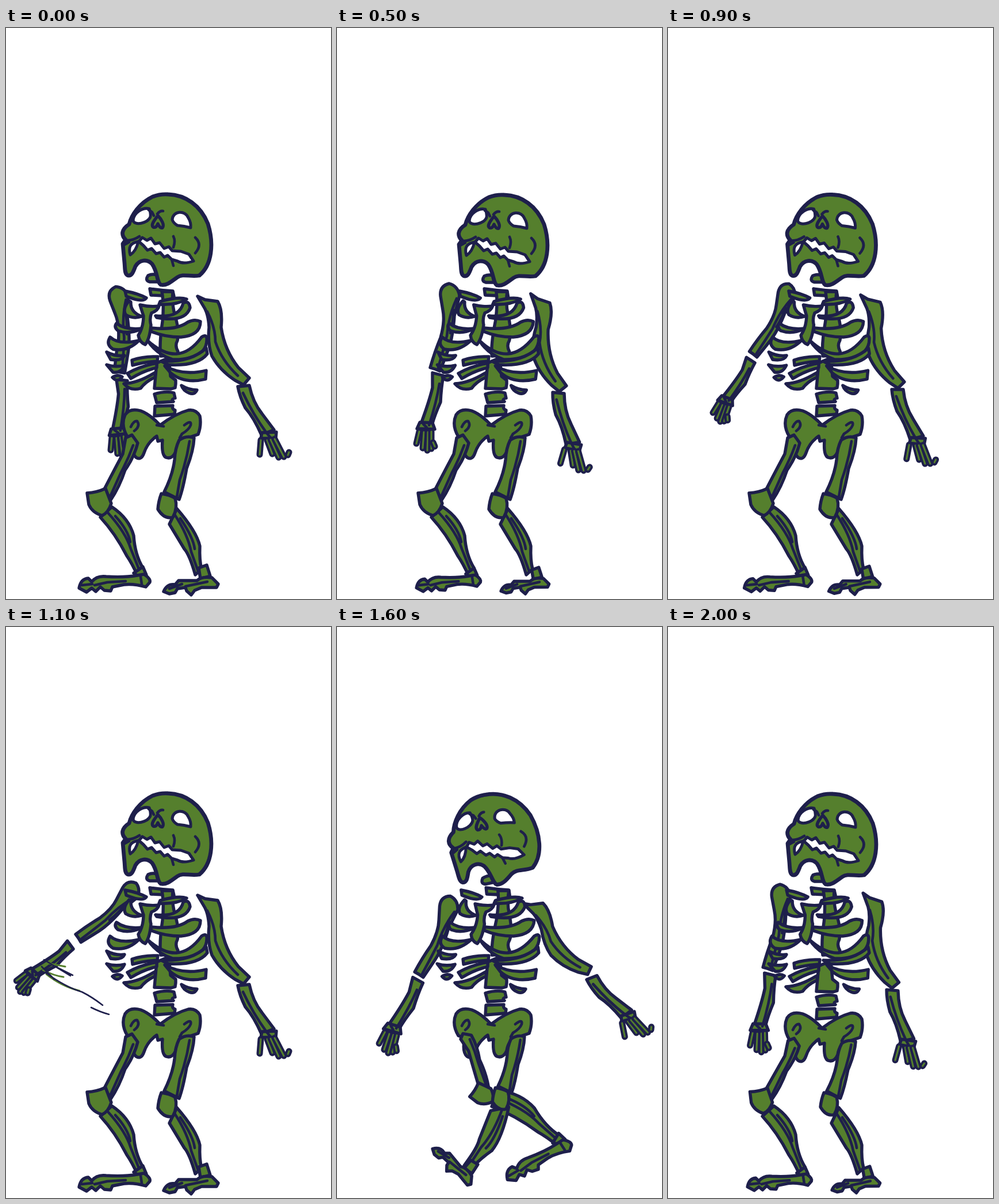
These frames come from a looping animation (565x992 px, 2100 ms). An HTML page:

```html
<!DOCTYPE html>
<html lang="en">
<head>
<meta charset="utf-8">
<title>Walking skeleton</title>
<style>
html, body { margin: 0; width: 100%; height: 100%; overflow: hidden; background: #fff; }
svg { display: block; width: 100vw; height: 100vh; }
path { stroke: #1e1f4b; stroke-width: 5.4; stroke-linejoin: round; stroke-linecap: round; vector-effect: non-scaling-stroke; }
.bone { fill: #557f2d; }
.line { fill: none; stroke-width: 4.6; }
.hole { fill: #fff; stroke-width: 5; }
.rim { fill: none; stroke-width: 11; }
.core { fill: none; stroke: #557f2d; stroke-width: 3; }
.skull { fill: #557f2d; stroke-width: 6.8; }
.thin { fill: none; stroke-width: 2.6; }
.leaf { fill: none; stroke: #557f2d; stroke-width: 3; }
</style>
</head>
<body>
<svg id="stage" viewBox="0 0 565 992" preserveAspectRatio="none"></svg>
<script>
const NS = "http://www.w3.org/2000/svg";
const stage = document.getElementById("stage");

// Each part is a list of [class, path, path, ...] in drawing order.
const art = {
  upperArmL: [
    ["bone", "M180 466Q178 448 195 444Q210 448 213 465Q208 485 204 500Q202 540 190 568L179 596Q170 592 162 590Q170 562 180 538Q188 510 184 490Z"],
    ["line", "M208 470Q194 500 191 535Q184 562 176 590M203 490Q202 510 197 530"]],
  foreArmL: [
    ["bone", "M166 599L185 604Q181 625 180 650Q170 672 165 690L145 690Q160 650 166 625Z",
      "M144 685L166 686L170 697L139 696Z"],
    ["line", "M178 618Q173 650 160 690M150 688L156 694"],
    ["finger", "M143 701L138 722", "M151 702L149 730", "M158 702L157 734", "M164 701L164 731", "M167 720L170 727"]],
  upperArmR: [
    ["bone", "M333 466L346 472L368 475Q377 490 374 520Q380 560 404 590L423 608L413 620L398 612Q372 595 358 570Q350 548 353 520Q352 500 346 488Z"],
    ["line", "M350 493Q364 520 364 545Q375 578 403 604"]],
  foreArmR: [
    ["bone", "M403 623L423 621Q429 650 445 670L466 698L444 707Q431 677 416 660Q406 640 403 623Z",
      "M445 703L470 702L469 713L443 713Z"],
    ["line", "M412 634Q430 672 452 702M451 701L460 712"],
    ["finger", "M443 716L441 741", "M454 716L463 740", "M460 715L474 746", "M467 714L483 745", "M492 737L490 742"]],
  lower: [
    ["bone", "M262 582L283 573L286 605L295 612V618L294 625L287 627L258 626Z",
      "M219 577Q240 570 264 571L263 579Q240 580 220 586Z",
      "M211 600Q232 588 262 582L262 590Q238 596 217 609Z",
      "M205 618Q230 617 260 598L259 607Q244 613 234 626Q216 631 205 618Z",
      "M258 636Q278 630 292 634L294 643Q286 645 291 649L262 651Z",
      "M259 657L290 656Q288 662 294 664L293 671L258 674Z",
      "M268 690Q250 671 234 665Q215 660 207 672Q199 690 211 710L222 714Q217 738 226 746Q235 752 240 738Q246 720 262 709L264 718L272 716Q270 742 278 746Q289 750 295 736Q298 716 316 712L334 706Q340 690 337 674Q330 662 317 664Q294 670 268 690Z"],
    ["line", "M217 693Q222 682 228 683Q234 692 223 700M310 690Q323 680 321 690Q318 698 306 705L302 712M262 690L274 692"]],
  thighL: [
    ["bone", "M208 712L219 707L229 721Q223 745 207 768Q197 798 182 820L171 801Q187 770 203 740Z",
      "M141 808Q158 807 173 800L183 826Q178 842 167 847Q150 842 144 828Z"],
    ["line", "M221 725Q212 750 200 772L182 812"]],
  shinL: [
    ["bone", "M164 850L184 832Q214 852 222 882Q224 915 238 938L228 950Q219 930 210 917Q190 878 164 850Z"],
    ["line", "M177 842Q208 876 217 905L231 940M190 848Q212 872 216 893"]],
  footL: [
    ["bone", "M222 947L238 936L244 950L236 956Z",
      "M127 973Q130 957 143 956L149 962Q158 951 174 953Q205 955 228 951L240 949Q252 957 250 963L243 971Q222 965 205 967L185 971L182 978L171 977L164 971L156 979L149 973L140 980Z"],
    ["line", "M132 968L150 966M154 968L176 963L208 961M234 953L236 966"]],
  thighR: [
    ["bone", "M301 716Q314 707 327 712Q326 735 314 765Q308 800 301 819L275 806Q290 776 293 750Q294 730 301 716Z",
      "M270 809Q285 811 294 817Q299 834 290 850Q275 854 264 836Q265 822 270 809Z"],
    ["line", "M319 718Q314 752 302 785L297 815"]],
  shinR: [
    ["bone", "M284 862L297 835Q331 874 337 900Q336 925 340 940L329 950Q319 915 310 905Q296 882 284 862Z"],
    ["line", "M293 845Q316 880 322 910L334 944M303 852Q326 886 328 905"]],
  footR: [
    ["bone", "M335 938L349 933L355 952L338 957Z",
      "M274 979Q280 965 294 967L300 960L332 960Q340 952 358 955L369 966L366 972L340 972L328 977L322 985L314 978L312 972L298 974L294 981L284 983Z"],
    ["line", "M284 974L306 966M312 970L350 962"]],
  upper: [
    ["bone", "M207 457Q229 461 244 469Q238 478 209 466Z",
      "M250 453Q270 456 290 457L292 466L252 464Z",
      "M271 458L290 458Q288 480 294 500Q302 528 298 543Q293 552 299 562L298 568L269 570Q266 550 272 510Q275 480 271 458Z",
      "M266 480Q296 482 314 471Q300 466 268 475Z",
      "M260 500Q302 504 308 478Q318 472 320 486Q312 512 262 503Z",
      "M252 521Q296 526 316 511Q328 505 338 510Q338 534 304 537Q276 537 252 527Z",
      "M246 543Q300 592 340 537Q347 532 349 538Q350 552 342 561Q322 577 290 576Q262 567 246 543Z",
      "M270 579Q322 581 348 556L350 566Q333 588 282 585Z",
      "M276 587Q308 605 348 595L347 610Q310 619 286 599Z",
      "M305 621Q318 629 332 629Q328 638 318 634Q308 630 305 621Z",
      "M214 474Q202 488 208 498Q221 506 236 501Q216 494 217 476Z",
      "M192 513Q208 525 236 522Q215 533 195 526Q187 520 192 513Z",
      "M181 537Q196 551 231 543Q211 563 186 558Q173 550 181 537Z",
      "M175 563Q190 571 206 569Q202 579 182 576Z",
      "M175 585Q190 590 206 586Q200 600 186 598Z",
      "M185 607Q194 601 202 606Q194 617 185 607Z",
      "M233 481Q250 485 266 483Q264 491 253 495Q249 505 252 516Q250 540 242 550Q232 546 230 534Q239 520 239 500Q235 488 233 481Z"]],
  head: [
    ["bone", "M247 430Q256 426 266 430L268 441L250 441Q241 439 247 430Z"],
    ["skull", "M282 289C312 290 338 308 351 340C362 375 358 412 336 430C320 433 308 426 298 433C288 440 280 448 269 446C262 442 264 424 254 410C246 401 232 402 225 414C221 424 219 431 212 430C206 428 207 418 206 408L203 375L208 368C200 360 200 350 214 341C218 325 232 304 255 293Q268 288 282 289Z"],
    ["hole", "M221 334C222 321 238 311 249 314Q252 322 251 328C247 340 222 344 221 334Z",
      "M289 333C290 317 312 316 317 330Q322 338 321 347Q310 344 298 343Q291 339 289 333Z",
      "M216 394Q210 374 230 371Q226 388 216 394Z",
      "M231 371L237 364L245 369L252 365L259 375L267 373L275 383L283 380L289 387L304 388L318 393L326 405Q308 411 298 405L288 402L281 395L275 398L268 390L261 392L253 383L246 386L239 378Z"],
    ["bone", "M264 326C258 334 251 342 256 346Q261 348 264 340Q268 349 272 347C276 342 270 332 264 326Z"],
    ["line", "M263 323Q268 317 273 318M248 316L254 320L257 326M208 369Q220 370 232 362M291 362Q295 370 291 381M329 364Q342 376 329 391M288 402L291 413M205 377L214 372"]],
  streaks: [
    ["leaf", "M72 584L103 590M64 596Q84 606 100 608M70 603Q96 624 128 632"],
    ["thin", "M66 578L112 606M82 588L116 605M62 590L84 612M68 600Q104 626 132 634Q150 643 168 657M148 661Q164 669 179 673"]]
};

const legs = {
  thighL: [218, 715, 165, 812], shinL: [166, 840, 232, 945], footL: [243, 960, 128, 970],
  thighR: [315, 712, 285, 812], shinR: [288, 850, 336, 945], footR: [366, 966, 275, 980]
};
const A = {
  head: [0, 0, 0], torso: [0, 0],
  upperArmR: [355, 475, 410, 612], foreArmR: [413, 622, 455, 702], ...legs
};
const B = {
  ...A, head: [9, 1, 0], torso: [6, 0],
  upperArmR: [357, 475, 385, 623], foreArmR: [385, 634, 410, 721],
  footL: [243, 960, 139, 970], footR: [366, 966, 286, 979]
};
const C = {
  head: [-7, 1, -12], torso: [9, 0],
  upperArmR: [346, 483, 431, 597], foreArmR: [443, 609, 503, 672],
  thighL: [223, 712, 248, 804], shinL: [266, 822, 385, 894], footL: [400, 900, 296, 957],
  thighR: [315, 712, 289, 803], shinR: [280, 836, 230, 938], footR: [231, 966, 166, 908]
};
const D = {
  ...B, head: [5, 1, 0], torso: [-1, 7],
  upperArmR: [359, 475, 388, 619], foreArmR: [390, 631, 416, 717],
  thighL: [218, 722, 165, 812], thighR: [315, 720, 285, 812]
};

const pair = (upperArmL, foreArmL) => ({ upperArmL, foreArmL });
const armIn = pair([193, 460, 198, 598], [202, 612, 194, 700]);
const armHang = pair([195, 455, 171, 593], [176, 602, 155, 690]);
const armBack = pair([220, 453, 126, 541], [112, 553, 48, 602]);
const armWide = pair([195, 478, 143, 604], [141, 614, 98, 696]);
const armLow = pair([195, 458, 174, 594], [178, 604, 159, 694]);

const mix = (p, q, k) => {
  const out = {};
  for (const name in p) out[name] = p[name].map((v, i) => v + (q[name][i] - v) * k);
  return out;
};

// [step, pose]; poses between keys are blended.
const bodyKeys = [[0, A], [5, B], [6, mix(B, D, 0.5)], [7, B], [11, A], [12, mix(A, C, 0.8)],
  [14, C], [15, mix(C, A, 0.06)], [16, C], [18, A], [20, D]];
const armKeys = [[0, armIn], [3, mix(armHang, armWide, 0.6)], [5, armHang], [6, mix(armHang, armLow, 0.5)],
  [7, armHang], [11, armBack], [12, mix(armBack, armWide, 0.33)], [14, armWide],
  [15, mix(armWide, armHang, 0.08)], [16, armWide], [18, armIn], [20, armLow]];

const sample = (keys, step) => {
  const i = Math.max(1, keys.findIndex(k => k[0] >= step));
  const [t0, p] = keys[i - 1], [t1, q] = keys[i];
  return mix(p, q, (step - t0) / (t1 - t0));
};

const addPath = (g, cls, d) => {
  const path = document.createElementNS(NS, "path");
  path.setAttribute("class", cls);
  path.setAttribute("d", d);
  g.append(path);
};

const order = ["upperArmL", "foreArmL", "upperArmR", "foreArmR", "streaks", "lower", "upper",
  "shinL", "footL", "thighL", "shinR", "footR", "thighR", "head"];
const groups = {};
for (const name of order) {
  const g = groups[name] = document.createElementNS(NS, "g");
  for (const [cls, ...paths] of art[name])
    for (const d of paths)
      for (const c of cls === "finger" ? ["rim", "core"] : [cls]) addPath(g, c, d);
  stage.append(g);
}

const rest = { ...A, ...armHang };

// Turn and scale that carries one joint pair onto another.
const carry = ([ax, ay, bx, by], [cx, cy, dx, dy]) => {
  const u = bx - ax, v = by - ay, s = dx - cx, t = dy - cy, n = u * u + v * v;
  const re = (s * u + t * v) / n, im = (t * u - s * v) / n;
  return `matrix(${re} ${im} ${-im} ${re} ${cx - re * ax + im * ay} ${cy - im * ax - re * ay})`;
};

const place = (name, value) => groups[name].setAttribute("transform", value);

function draw(step) {
  const pose = { ...sample(bodyKeys, step), ...sample(armKeys, step) };
  const { head: [x, y, turn], torso: [lean, drop], ...limbs } = pose;
  place("head", `translate(${x} ${y}) rotate(${turn} 280 370)`);
  const k = lean / 120;
  place("upper", `matrix(1 0 ${-k} 1 ${k * 575} 0)`);
  place("lower", `translate(0 ${drop})`);
  for (const name in limbs) place(name, carry(rest[name], limbs[name]));
  groups.streaks.style.display = step === 11 ? "" : "none";
}

const start = performance.now();
let last = -1;
function tick() {
  const step = Math.floor((performance.now() - start) % 2100 / 100);
  if (step !== last) draw(last = step);
  requestAnimationFrame(tick);
}
tick();
</script>
</body>
</html>
```
